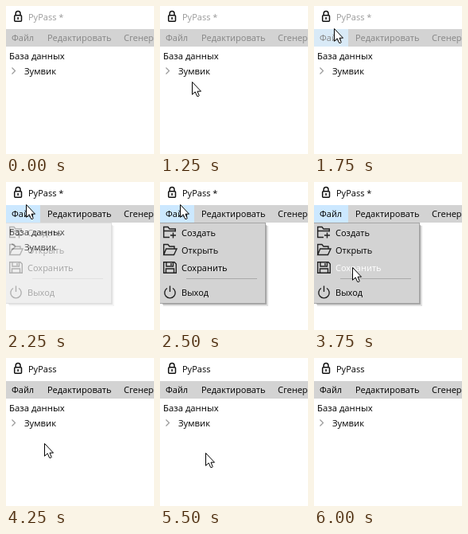
Write an HTML page that moves like this. It is 186x186 px and loops after 7 s.

```html
<!DOCTYPE html>
<html lang="ru">
<head>
<meta charset="utf-8">
<style>
html, body { margin: 0; width: 100%; height: 100%; overflow: hidden; background: #fff; }
svg { display: block; width: 186px; height: 186px; font: 11px "Open Sans", "Noto Sans", sans-serif; }
#bar { fill: #000; }
.idle #bar { fill: #858585; }
.idle #title { fill: #999; }
.icon { fill: none; stroke: #222; stroke-width: 1.4; }
</style>
</head>
<body>
<svg id="app" viewBox="0 0 186 186">
  <g fill="none" stroke="#111" stroke-width="1.5">
    <rect x="10.7" y="11.7" width="8.8" height="7.6" rx="1"/>
    <path d="M12.2 11.5V9.5a2.9 2.9 0 0 1 5.8 0v2"/>
    <path d="M15.1 14v3"/>
  </g>
  <text id="title" x="28" y="18">PyPass<tspan id="star"> *</tspan></text>

  <path fill="#d3d3d3" d="M0 29H186V51H0z"/>
  <path id="hover" d="M0 29H43V51H0z"/>
  <g id="bar">
    <text x="7" y="44">Файл</text>
    <text x="52" y="44">Редактировать</text>
    <text x="148" y="44">Сгенерировать</text>
  </g>

  <g font-size="11.3">
    <text x="4" y="67">База данных</text>
    <text x="23" y="86">Зумвик</text>
  </g>
  <path d="M7.5 77.5l4 4-4 4" fill="none" stroke="#999" stroke-width="1.2"/>

  <g id="menu">
    <path fill="#000" opacity=".12" d="M4 55H136V156H4z"/>
    <path fill="#000" opacity=".25" d="M3 54H134V154H3z"/>
    <rect x="-.5" y="51.5" width="133" height="101" fill="#d3d3d3" stroke="#a5a5a5"/>
    <path d="M33 121.5H122" stroke="#aaa"/>
    <g class="icon">
      <path d="M12 69.5H4.7V56.5H10l2 2.5h7.3v3.5M4.7 61.5H19"/>
      <path d="M16.5 63.5v7M13 67h7"/>
      <path d="M4.7 91.5V78.5H10l2 2.5h6v3M4.7 91.5l3-7.5H21l-3.5 7.5z"/>
      <path d="M4.7 100.7H18l2.3 2.3v11.3H4.7zM8 101v5h8.5v-5M7.5 114v-5h10v5M14 102v3"/>
      <path d="M9 133.5a6.7 6.7 0 1 0 7 0M12.5 130.5v7.5"/>
    </g>
    <g id="items">
      <text x="27" y="68">Создать</text>
      <text x="27" y="90">Открыть</text>
      <text x="27" y="112">Сохранить</text>
      <text x="27" y="143">Выход</text>
    </g>
  </g>

  <path id="cursor" d="M.5 .5V16.3L4.2 12.9L6.6 18.4H8.6L9.2 17.5L7 12.2H11.5z" fill="#fff" stroke="#000"/>
</svg>
<script>
const $ = id => document.getElementById(id);
const items = [...$("items").children];

// The pointer jumps between sampled positions: [start ms, x, y]
const path = [
  [1000, 67, 153], [1250, 40, 95], [1500, 30, 58], [1750, 25, 28],
  [3000, 25, 38], [3250, 31, 58], [3500, 39, 83], [3750, 48, 107],
  [5500, 57, 119], [5750, 76, 155]
];
const show = (el, on) => el.setAttribute("visibility", on ? "visible" : "hidden");

function draw(now) {
  const t = now % 7000;
  const active = t >= 2250, closed = t >= 4250;

  $("app").classList.toggle("idle", !active);
  show($("star"), !closed);
  show($("hover"), t >= 1750 && !closed);
  $("hover").setAttribute("fill", active ? "#cce8ff" : "#d9eaf7");

  show($("menu"), active && !closed);
  $("menu").setAttribute("opacity", t < 2500 ? .35 : 1);
  const picked = t < 3250 ? -1 : Math.floor((t - 3250) / 250);
  items.forEach((el, i) => el.setAttribute("fill", i === Math.min(picked, 2) ? "#fff" : "#000"));

  const spot = path.filter(p => p[0] <= t).pop();
  show($("cursor"), spot && t < 6000);
  if (spot) $("cursor").setAttribute("transform", `translate(${spot[1]} ${spot[2]})`);
}

let start;
function tick(now) {
  start ??= now;
  draw(now - start);
  requestAnimationFrame(tick);
}
draw(0);
requestAnimationFrame(tick);
</script>
</body>
</html>
```
